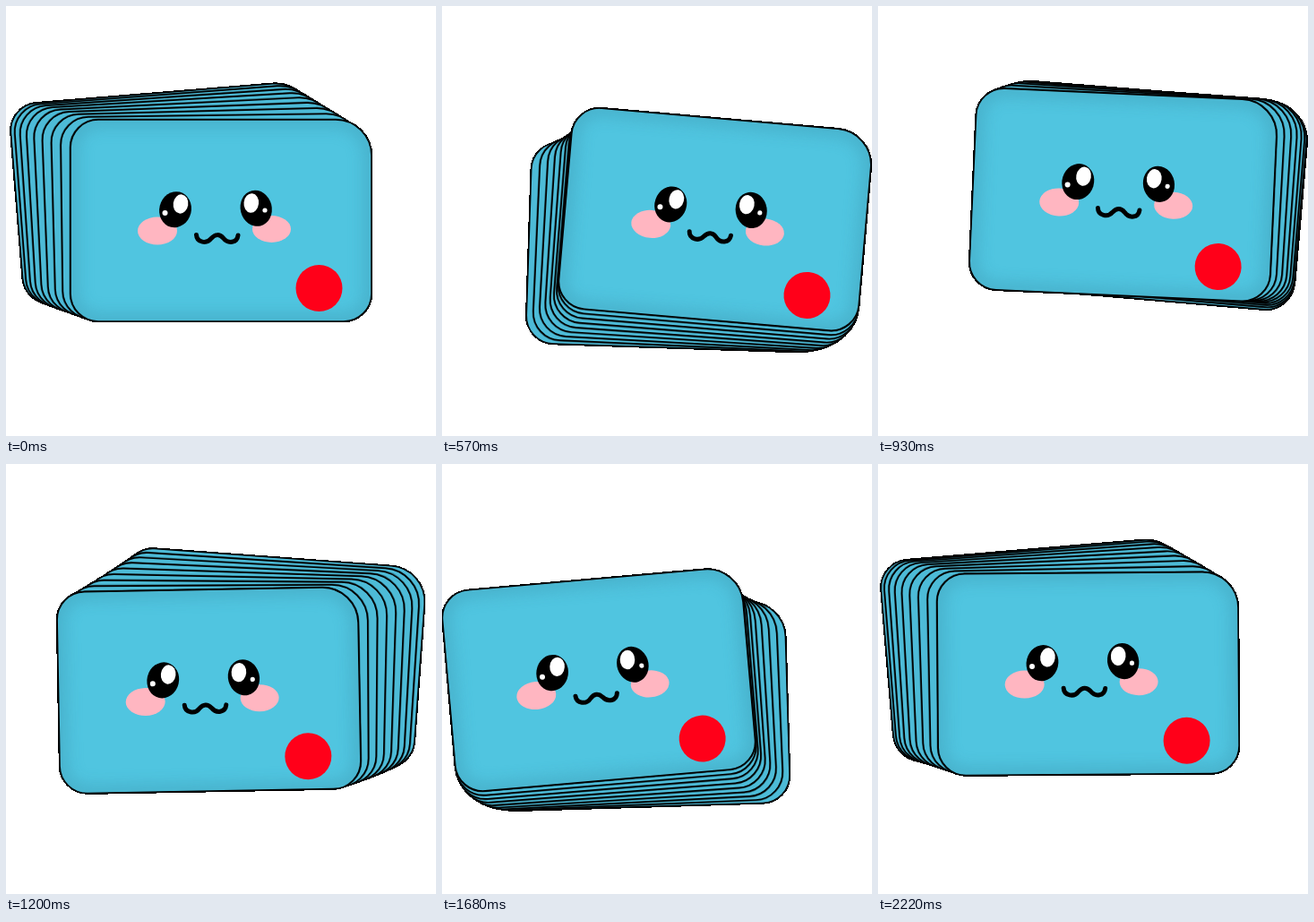
Animation, 480 px wide and 480 px high, one loop 2250 ms. Source, as an HTML page:

```html
<!DOCTYPE html>
<html lang="en">
<head>
<meta charset="utf-8">
<title>Floating card stack</title>
<style>
html, body { margin: 0; width: 100%; height: 100%; overflow: hidden; background: #fff; }
svg { display: block; width: 100vw; height: 100vh; }
</style>
</head>
<body>
<svg viewBox="0 0 480 480">
  <defs>
    <filter id="soft"><feGaussianBlur stdDeviation="9"/></filter>
    <!-- Hard silhouette: faint outer edges vanish over the page, but stay over other cards. -->
    <filter id="crisp" color-interpolation-filters="sRGB">
      <feComponentTransfer><feFuncA type="discrete" tableValues="0 1"/></feComponentTransfer>
    </filter>
    <path id="shape" d="M-137-112.5H128A40 40 0 0 1 168-72.500V81.500A31 31 0 0 1 137 112.500H-137A31 31 0 0 1-168 81.500V-81.500A31 31 0 0 1-137-112.500Z"/>
    <clipPath id="edge"><use href="#shape"/></clipPath>
    <g id="back">
      <use href="#shape" fill="none" stroke="#000" stroke-width="3" opacity=".45"/>
      <use href="#shape" fill="#4dbbd7" stroke="#000" stroke-width="1.7"/>
    </g>
    <g id="front">
      <use href="#back"/>
      <g clip-path="url(#edge)">
        <use href="#shape" fill="#50c5e0"/>
        <use href="#shape" fill="none" stroke="#3d98b0" stroke-width="14" opacity=".55" filter="url(#soft)"/>
      </g>
      <use href="#shape" fill="none" stroke="#000" stroke-width="1.7"/>
      <g fill="#ffb6c1">
        <ellipse cx="-71" cy="11.5" rx="22" ry="15.5"/>
        <ellipse cx="56.5" cy="9.5" rx="21.5" ry="15"/>
      </g>
      <ellipse rx="17.8" ry="20.2" transform="translate(-51 -12.3) rotate(14)"/>
      <ellipse rx="17.5" ry="20.2" transform="translate(39.2 -13.7) rotate(-14)"/>
      <g fill="#fff">
        <ellipse rx="8.3" ry="10.7" transform="translate(-45 -18.500) rotate(8)"/>
        <ellipse rx="8.3" ry="10.7" transform="translate(33.800 -19.500) rotate(6)"/>
        <circle cx="-62.5" cy="-8.5" r="3"/>
        <circle cx="49" cy="-11.5" r="2.6"/>
      </g>
      <path d="M-27.500 16C-27 24.500-16 26.500-11 20Q-4 12.500 2.500 19.500C8 26.500 18 25 19 16.500" fill="none" stroke="#000" stroke-width="5" stroke-linecap="round"/>
      <circle cx="109.5" cy="75.5" r="26" fill="#ff0019"/>
    </g>
  </defs>
  <g id="stack" filter="url(#crisp)"></g>
</svg>
<script>
const LOOP = 2250, STEP = 30, TRAIL = 8, LAG = 0.15;
const stack = document.getElementById('stack');
const cards = [];

for (let k = TRAIL; k >= 0; k--) {
  const el = document.createElementNS('http://www.w3.org/2000/svg', 'use');
  el.setAttribute('href', k ? '#back' : '#front');
  stack.append(el);
  cards.push({ el, lag: k * LAG });
}

// Figure-eight path; every card behind trails by a constant phase.
function draw(now) {
  const t = Math.floor((now % LOOP) / STEP) * STEP;
  const phase = t / LOOP * 2 * Math.PI;
  for (const { el, lag } of cards) {
    const sway = Math.sin(phase - lag);
    const bob = Math.sin(2 * phase - lag);
    el.setAttribute('transform',
      `translate(${240 + 65 * sway} ${239.5 + 32.5 * bob}) rotate(${5 * sway})`);
  }
}

const start = performance.now();
function tick() {
  draw(performance.now() - start);
  requestAnimationFrame(tick);
}
tick();
</script>
</body>
</html>
```
